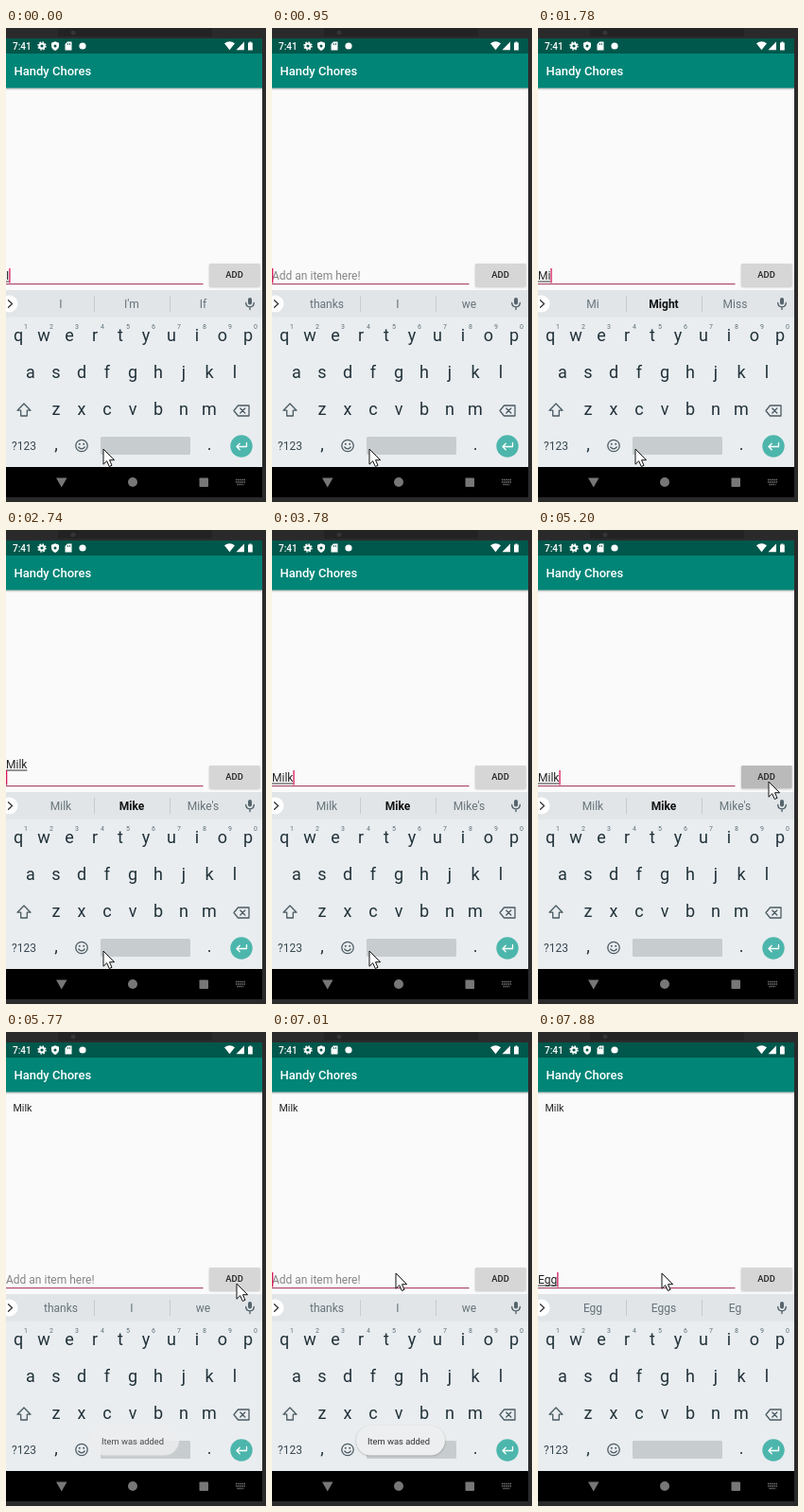
These frames come from a looping animation (275 px wide and 501 px high, 8000 ms). An HTML page:

```html
<!DOCTYPE html>
<html lang="en">
<head>
<meta charset="utf-8">
<title>To-do list</title>
<style>
  html, body { margin: 0; width: 100%; height: 100%; overflow: hidden; background: #2b2a2b; }
  svg { display: block; width: 275px; height: 501px; }
  text { font-family: Roboto, "Noto Sans", sans-serif; white-space: pre; }
  .mid { text-anchor: middle; }
  .medium { font-weight: 500; }
  .key { font-size: 18px; fill: #22323a; }
  .digit { font-size: 7px; fill: #5f6f78; }
  .small { font-size: 12px; fill: #37474f; }
  .field { font-size: 12px; fill: #222; }
  .tip { font-size: 12px; fill: #667279; }
  .tip.bold { font-weight: 700; fill: #111; }
  .line { fill: none; stroke: #4b5a62; stroke-width: 1.3; stroke-linejoin: round; stroke-linecap: round; }
</style>
</head>
<body>
<svg viewBox="0 0 275 501">
  <defs>
    <linearGradient id="shade" x2="0" y2="1">
      <stop offset="0" stop-opacity=".25"/>
      <stop offset="1" stop-opacity="0"/>
    </linearGradient>
    <filter id="soft" x="-20%" y="-40%" width="140%" height="180%">
      <feGaussianBlur stdDeviation="1.2"/>
    </filter>
  </defs>

  <!-- phone frame -->
  <rect width="275" height="501" fill="#2b2a2b"/>
  <rect x="55" width="163" height="9" fill="#242324"/>
  <circle cx="71" cy="5" r="2.5" fill="#353436"/>

  <!-- status bar -->
  <rect y="11" width="271" height="16" fill="#00574b"/>
  <text class="medium" x="7" y="22.6" font-size="10" fill="#fff">7:41</text>
  <g fill="#fff">
    <circle cx="38" cy="19" r="2.6" fill="none" stroke="#fff" stroke-width="2"/>
    <circle cx="38" cy="19" r="4" fill="none" stroke="#fff" stroke-width="1.4" stroke-dasharray="1.6 1.54"/>
    <path d="M52 14.2l4 1.5v3q0 3.6-4 5.3q-4-1.7-4-5.3v-3z"/>
    <circle cx="52" cy="19" r="1.5" fill="#00574b"/>
    <path d="M65 14.5h4.5v9h-7v-6.5z"/>
    <path d="M65.5 16v2M67.5 16v2" stroke="#00574b" stroke-width=".8"/>
    <circle cx="81" cy="19" r="3.6"/>
    <path d="M231 16.3q5.5-4 11 0l-5.5 7z"/>
    <path d="M252 14.5v8.7h-8.5z"/>
    <path d="M256 15.4h1.4v-1h2v1h1.4v8H256z"/>
  </g>

  <!-- app -->
  <rect y="27" width="271" height="37" fill="#008577"/>
  <text class="medium" x="8.5" y="50" font-size="13" fill="#fff">Handy Chores</text>
  <rect y="63.5" width="271" height="213.5" fill="#fafafa"/>
  <rect y="63.5" width="271" height="2.5" fill="url(#shade)"/>
  <text id="item" x="7.5" y="84" font-size="10.7" fill="#222">Milk</text>

  <text id="hint" class="field" x="0" y="266" style="fill:#858585">Add an item here!</text>
  <text id="entry" class="field" x="0"></text>
  <rect id="mark" x="0" height="1" fill="#333"/>
  <rect y="270" width="208.5" height="1.2" fill="#ad4a70"/>
  <rect id="caret" y="254" width="1.3" height="15.5" fill="#d81b60"/>

  <rect x="215" y="250" width="53.5" height="24" rx="1" opacity=".22" filter="url(#soft)"/>
  <rect id="button" x="215" y="249" width="53.5" height="24" rx="1"/>
  <text class="mid medium" x="241.6" y="264.4" font-size="9.4" fill="#222">ADD</text>

  <!-- keyboard -->
  <rect y="277" width="271" height="187" fill="#e9edf0"/>
  <rect y="277" width="271" height="28.5" fill="#e1e5e8"/>
  <path d="M93.5 283v17M173.5 283v17" stroke="#c5cacd"/>
  <circle cx="3.5" cy="291.5" r="9" fill="#fff"/>
  <path d="M2.5 287.7l4 3.8l-4 3.8" class="line" style="stroke:#333"/>
  <g id="tips"></g>
  <rect x="256" y="285" width="4" height="7.5" rx="2" fill="#56656d"/>
  <path d="M253.7 290.5q.3 4.3 4.3 4.3t4.3-4.3M258 295v2.5" class="line"/>
  <g id="keys"></g>
  <path d="M19 397l7 7.2h-3.7v5.8h-6.6v-5.8H12z" class="line"/>
  <path d="M245.5 399H257v11h-11.5l-4.5-5.5zM247.8 402l5 5M252.800 402l-5 5" class="line"/>
  <text class="mid small" x="19" y="446">?123</text>
  <circle cx="80" cy="441.500" r="6.200" class="line"/>
  <path d="M76.800 443q3.200 3.800 6.400 0" class="line"/>
  <circle cx="77.800" cy="439.700" r="1" fill="#4b5a62"/>
  <circle cx="82.200" cy="439.700" r="1" fill="#4b5a62"/>
  <rect x="100" y="432" width="95" height="19" rx="1.500" fill="#c7cccf"/>
  <circle cx="249" cy="442" r="11.700" fill="#4db6ac"/>
  <path d="M254.500 438.500v4H244m3.200-3.200l-3.200 3.200l3.200 3.200" class="line" style="stroke:#fff"/>

  <!-- navigation bar -->
  <rect y="464" width="271" height="32" fill="#000"/>
  <g fill="#777">
    <path d="M53 475.500h11.500l-5.750 10z"/>
    <circle cx="134" cy="480" r="5"/>
    <rect x="204.500" y="475.500" width="9.500" height="9.500" rx=".8"/>
    <path d="M243 477.500h10M243 480h10M244.500 482.500h7" stroke="#777" stroke-width="1.400" stroke-dasharray="1.400 .75"/>
  </g>

  <g id="toast">
    <rect id="glow" x="89" y="417" width="94" height="31" rx="15.500" opacity=".25" filter="url(#soft)"/>
    <rect x="89" y="416" width="94" height="31.500" rx="15.700" fill="#eceeef"/>
    <text class="mid" x="134" y="435.600" font-size="9.350" fill="#333">Item was added</text>
  </g>

  <path id="mouse" d="M0 0V16.200L3.700 12.700L6.300 18.500L9 17.300L6.500 11.700H11.600Z" fill="#fff" stroke="#111"/>
</svg>

<script>
const LOOP = 8000;
const $ = id => document.getElementById(id);
const svgNode = (parent, className, x, y, label) => {
  const node = document.createElementNS("http://www.w3.org/2000/svg", "text");
  node.setAttribute("class", className);
  node.setAttribute("x", x);
  node.setAttribute("y", y);
  node.textContent = label;
  return parent.appendChild(node);
};

// Keys sit on a 27 px grid.
const rows = [["qwertyuiop", 13, 331], ["asdfghjkl", 26, 370], ["zxcvbnm", 53, 409]];
rows.forEach(([letters, left, y], row) => [...letters].forEach((letter, i) => {
  const x = left + i * 27;
  svgNode($("keys"), "mid key", x, y, letter);
  if (row === 0) svgNode($("keys"), "mid digit", x + 8, y - 13, (i + 1) % 10);
}));
svgNode($("keys"), "mid key", 53, 446, ",");
svgNode($("keys"), "mid key", 215, 446, ".");
const tips = [58, 133, 208.5].map(x => svgNode($("tips"), "mid tip", x, 296, ""));

// Suggestions; a leading * marks the bold one.
const IDLE = "thanks|I|we";
const MILK = "Milk|*Mike|Mike's";

// Each step changes part of the state and holds until the next.
const steps = [
  [0, { text: "I", tips: "I|I'm|If", caret: 1, newline: 0, item: 0, toast: 0, press: 0, mouse: [103, 445] }],
  [400, { caret: 0 }],
  [830, { text: "", caret: 1 }],
  [950, { tips: IDLE }],
  [1350, { text: "M" }],
  [1470, { tips: "M|*My|Maybe" }],
  [1780, { text: "Mi", tips: "Mi|*Might|Miss" }],
  [2030, { text: "Mil" }],
  [2150, { text: "Milk", tips: MILK }],
  [2580, { newline: 1, caret: 0 }],
  [2740, { caret: 1 }],
  [3010, { tips: IDLE, caret: 0 }],
  [3480, { caret: 1 }],
  [3780, { newline: 0, tips: MILK }],
  [4220, { caret: 0, mouse: [118, 430] }],
  [4350, { mouse: [168, 374] }],
  [4480, { mouse: [220, 305] }],
  [4600, { mouse: [252, 268] }],
  [4730, { caret: 1, mouse: [244, 266] }],
  [5040, { press: 0.5 }],
  [5200, { press: 1 }],
  [5350, { text: "", item: 1, press: 0.6 }],
  [5480, { press: 0, tips: IDLE }],
  [5650, { toast: 0.4, caret: 0 }],
  [5770, { toast: 0.85 }],
  [5890, { toast: 0.95, mouse: [203, 262] }],
  [6010, { toast: 1, mouse: [146, 255] }],
  [6160, { caret: 1, mouse: [138, 254] }],
  [6300, { mouse: [133, 255] }],
  [6440, { mouse: [131, 255] }],
  [6580, { caret: 0 }],
  [7010, { caret: 1 }],
  [7320, { text: "E" }],
  [7440, { tips: "E|Even|Every" }],
  [7600, { text: "Eg", tips: "Eg|Egg|Eggs", toast: 0.5 }],
  [7760, { toast: 0 }],
  [7880, { text: "Egg", tips: "Egg|Eggs|Eg" }]
];

const stateAt = time =>
  Object.assign({}, ...steps.filter(([start]) => start <= time).map(([, change]) => change));

function draw(state) {
  const { text, newline, press, mouse } = state;
  const baseline = newline ? 252 : 266;
  $("entry").textContent = text;
  $("entry").setAttribute("y", baseline);
  const width = text ? $("entry").getComputedTextLength() : 0;
  $("mark").setAttribute("y", baseline + 1.5);
  $("mark").setAttribute("width", width);
  // A finished word loses its underline once the suggestions reset.
  $("mark").style.opacity = newline && state.tips === IDLE ? 0 : 1;
  $("caret").setAttribute("x", newline ? 0 : width);
  $("caret").style.opacity = state.caret;
  $("hint").style.opacity = text ? 0 : 1;
  $("item").style.opacity = state.item;
  $("toast").style.opacity = state.toast;
  $("glow").style.opacity = state.toast === 1 ? 0.25 : 0;
  const grey = 214 - 28 * press;
  $("button").style.fill = `rgb(${grey},${grey},${grey})`;
  $("mouse").setAttribute("transform", `translate(${mouse})`);
  state.tips.split("|").forEach((word, i) => {
    const bold = word[0] === "*";
    tips[i].textContent = bold ? word.slice(1) : word;
    tips[i].classList.toggle("bold", bold);
  });
}

const began = performance.now();
function tick() {
  draw(stateAt((performance.now() - began) % LOOP));
  requestAnimationFrame(tick);
}
tick();
</script>
</body>
</html>
```
